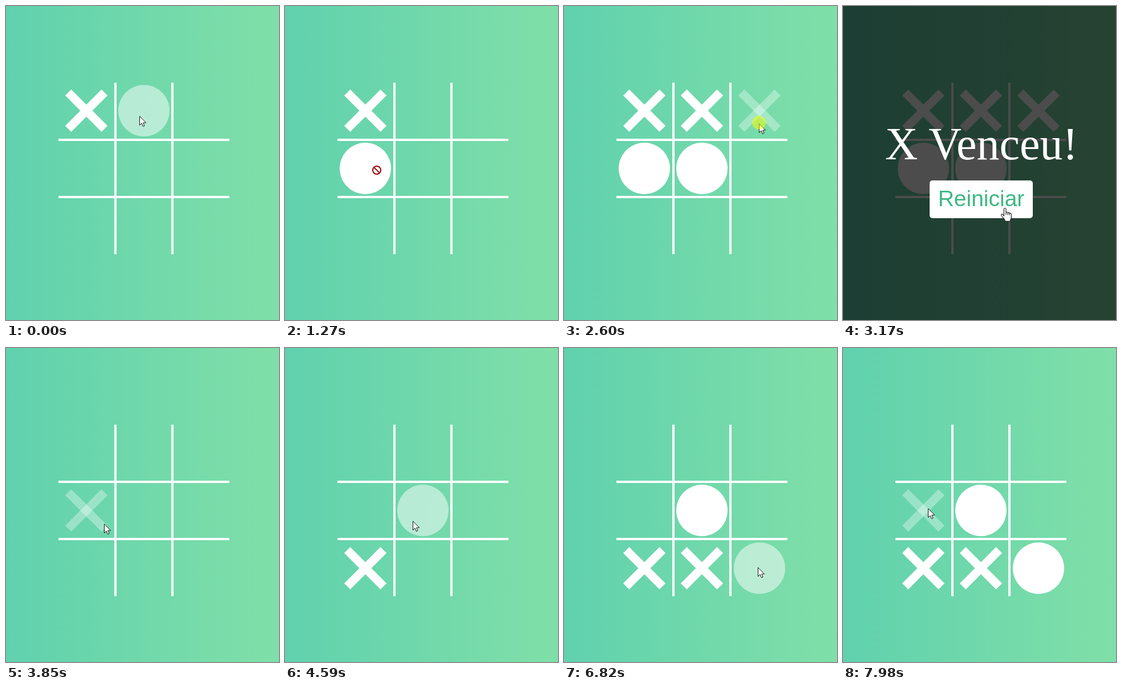
An HTML page for the animation above (8 s loop, 479 px wide and 549 px high).

```html
<!DOCTYPE html>
<html lang="pt">
<head>
<meta charset="utf-8">
<title>Jogo da velha</title>
<style>
html, body { margin: 0; width: 100%; height: 100%; overflow: hidden; }
body { position: relative; background: linear-gradient(to right, #60d1ae, #80dfa8); }
svg { position: absolute; left: 0; top: 0; width: 479px; height: 549px; }
.grid { stroke: #fff; stroke-width: 4; }
.cell > * { display: none; fill: #fff; }
.cell.x .cross, .cell.o .disc { display: block; }
.hover .cross { fill-opacity: .33; }
.hover .disc { fill-opacity: .5; }
#overlay { position: absolute; inset: 0; display: none; background: rgba(0, 0, 0, .7); }
#overlay.show { display: block; }
#overlay div { position: absolute; white-space: nowrap; text-align: center; }
.title {
  left: 3px; width: 480px; top: 195px; color: #fff;
  font: 80px/92px "Liberation Serif", "Times New Roman", serif;
}
#button {
  left: 152px; top: 305px; width: 181px; height: 66px; border-radius: 5px;
  background: #3fb883; color: #fff;
  font: 39px/64px "Liberation Sans", Arial, sans-serif;
}
#button.hover { background: #fff; color: #3fb883; }
#pointer > g { display: none; stroke-linejoin: round; }
#pointer.arrow .arrow, #pointer.hand .hand, #pointer.no .no { display: block; }
</style>
</head>
<body>
<svg viewBox="0 0 479 549">
  <path class="grid" d="M192 134v300M292 134v300M92 234h300M92 334h300"/>
  <g id="board"></g>
</svg>
<div id="overlay">
  <div class="title">X Venceu!</div>
  <div id="button">Reiniciar</div>
</div>
<svg viewBox="0 0 479 549">
  <g id="pointer">
    <g class="arrow">
      <path d="M.5 .8V16.4L4.1 13L6.5 18.5L9 17.4L6.7 12.1H11.6Z" fill="#fff" stroke="#111"/>
    </g>
    <g class="hand" fill="#fff" stroke="#222" stroke-width="1.2">
      <path d="M-.6 2C-.6 0 3 0 3 2V8C3 6.8 6.3 7 6.3 8.8C6.3 7.6 9.4 8 9.4 9.8C9.4 8.8 12.4 9.2 12.4 11.5V16C12.4 19 10.4 20 10.4 23.3H1.4C1.4 20 -2 17.5 -5 13.5C-6 11 -4 10 -2.5 11.6L-.6 14Z"/>
      <path d="M3 8V12M6.3 8.8V12.4M9.4 9.8V12.8" fill="none"/>
    </g>
    <g class="no" fill="none" stroke="#a00000" stroke-width="2">
      <circle r="7"/><path d="M-4.9 -4.9L4.9 4.9"/>
    </g>
    <circle id="press" r="12" cy="-1" fill="#ff0" fill-opacity=".5"/>
  </g>
</svg>
<script>
const LOOP = 8000, PRESS = 65;

// The pointer rests between glides; each press plays the cell under it.
const home = { x: 234, y: 192 };
const glides = [
  { from: 30, to: 200, x: 241, y: 192 },
  { from: 430, to: 1000, x: 161, y: 287 },
  { from: 1275, to: 1580, x: 236, y: 190 },
  { from: 1680, to: 1970, x: 238, y: 284 },
  { from: 2110, to: 2520, x: 342, y: 205 },
  { from: 2670, to: 3020, x: 283, y: 353 },
  { from: 3380, to: 3720, x: 170, y: 346 },
  { from: 3720, to: 3920, x: 173, y: 289 },
  { from: 3960, to: 4210, x: 143, y: 384 },
  { from: 4340, to: 4650, x: 238, y: 288 },
  { from: 4930, to: 5600, x: 329, y: 364 },
  { from: 5740, to: 6000, x: 244, y: 383 },
  { from: 6340, to: 6560, x: 330, y: 383 },
  { from: 6700, to: 6820, x: 340, y: 383 },
  { from: 7090, to: 7710, x: 148, y: 204 },
  { from: 7780, to: 7970, x: 149, y: 280 }
];
const presses = [1200, 1600, 2040, 2600, 3300, 4270, 4850, 6270, 7020];

const $ = id => document.getElementById(id);
const board = $('board'), pointer = $('pointer');

board.innerHTML = Array.from({ length: 9 }, (_, i) => {
  const x = 141 + 101 * (i % 3), y = 183 + 101 * Math.floor(i / 3);
  const bar = a => `<rect class="cross" x="-45" y="-7.5" width="90" height="15" transform="rotate(${a})"/>`;
  return `<g class="cell" transform="translate(${x} ${y})">${bar(45)}${bar(-45)}<circle class="disc" r="45"/></g>`;
}).join('');

function ease(p) {
  return (p + p * p * (3 - 2 * p)) / 2;
}

function pointerAt(t) {
  let { x, y } = home;
  for (const g of glides) {
    if (t <= g.from) break;
    const e = ease(Math.min(1, (t - g.from) / (g.to - g.from)));
    x += (g.x - x) * e;
    y += (g.y - y) * e;
  }
  return { x, y };
}

function cellAt({ x, y }) {
  const c = Math.floor((x - 92) / 100), r = Math.floor((y - 134) / 100);
  return c >= 0 && c < 3 && r >= 0 && r < 3 ? r * 3 + c : -1;
}

function hasRow(marks) {
  return [0, 3, 6].some(i => marks[i] && marks[i] === marks[i + 1] && marks[i] === marks[i + 2]);
}

// Replays every press finished by time t.
function gameAt(t) {
  let marks = Array(9).fill(''), turn = 'o';
  marks[0] = 'x';
  for (const p of presses.filter(p => p + PRESS <= t)) {
    if (hasRow(marks)) {
      marks = Array(9).fill('');
      turn = 'x';
    } else {
      marks[cellAt(pointerAt(p))] = turn;
      turn = turn === 'x' ? 'o' : 'x';
    }
  }
  return { marks, turn, won: hasRow(marks) };
}

function draw(t) {
  const at = pointerAt(t), { x, y } = at;
  const { marks, turn, won } = gameAt(t);
  const over = won ? -1 : cellAt(at);

  marks.forEach((mark, i) => {
    const ghost = !mark && i === over;
    board.children[i].setAttribute('class', 'cell ' + (ghost ? turn + ' hover' : mark));
  });

  const onButton = won && x > 152 && x < 333 && y > 305 && y < 371;
  $('overlay').className = won ? 'show' : '';
  $('button').className = onButton ? 'hover' : '';

  const shape = onButton ? 'hand' : marks[over] ? 'no' : 'arrow';
  pointer.setAttribute('class', shape);
  pointer.setAttribute('transform', `translate(${Math.round(x)} ${Math.round(y)})`);
  const down = presses.some(p => t >= p && t < p + PRESS);
  $('press').style.display = down ? 'block' : 'none';
}

const start = performance.now();
function tick() {
  draw((performance.now() - start) % LOOP);
  requestAnimationFrame(tick);
}
tick();
</script>
</body>
</html>
```
